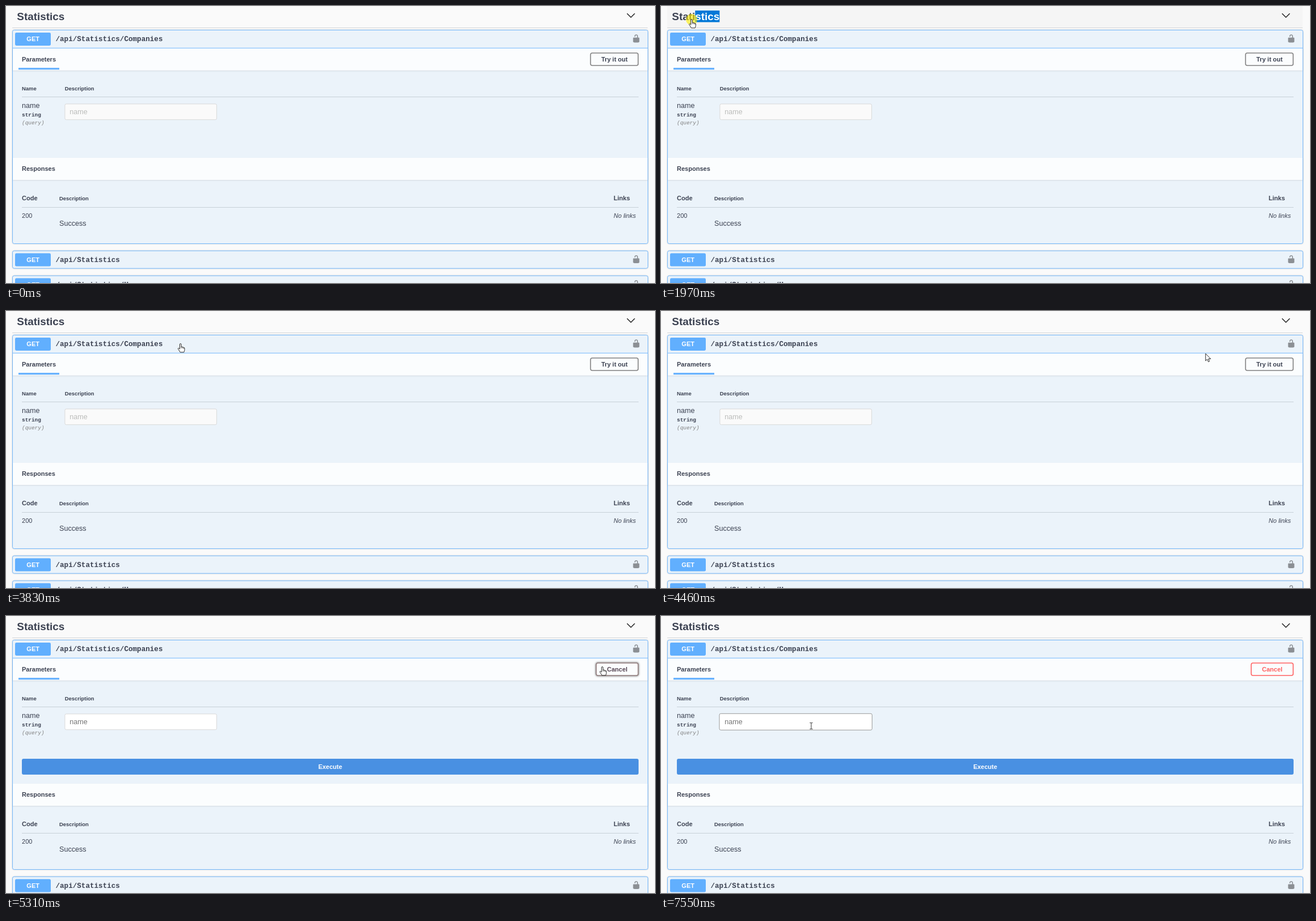
Recreate the animation shown at these times as an HTML page. Size 1145 by 489 pixels, loop 8 s.

```html
<!DOCTYPE html>
<html lang="en">
<head>
<meta charset="utf-8">
<title>API explorer</title>
<style>
html, body { margin: 0; width: 100%; height: 100%; overflow: hidden; background: #fafafa; }
svg { display: block; width: 100vw; height: 100vh; font: 11.02px "Liberation Sans", Arial, sans-serif; fill: #3b4151; }
.b { font-weight: 700; }
.sm { font-weight: 700; font-size: 9.44px; }
.lg { font-size: 12.6px; }
.title { font-weight: 700; font-size: 18.9px; }
.mono { font: 700 12.6px "Liberation Mono", "Courier New", monospace; }
.tiny { font-size: 9.44px; }
.query { font-weight: 400; font-style: italic; fill: #808080; }
.mid { text-anchor: middle; }
.white { fill: #fff; }
.block { fill: #ebf3fa; stroke: #61affe; stroke-width: .85; filter: drop-shadow(0 0 1.2px rgba(0,0,0,.19)); }
.bar { fill: #fbfdfe; filter: drop-shadow(0 1px 1px rgba(0,0,0,.1)); }
.line { fill: none; stroke: #3b4151; stroke-opacity: .2; }
.btn { fill: #fbfdfe; stroke: #808080; stroke-width: 1.6; }
.glow { fill: none; stroke: #000; stroke-opacity: .45; stroke-width: 3; filter: blur(1.6px); }
.cur { stroke: #111; stroke-width: .9; fill: #fff; stroke-linejoin: round; }
</style>
</head>
<body>
<svg viewBox="0 0 1145 489">
  <defs>
    <g id="row">
      <rect x="16" y="47" width="63" height="23" rx="2.4" fill="#61affe"/>
      <text class="b mid white" x="47.7" y="62">GET</text>
      <path transform="translate(1104 49.5) scale(.787)" fill="#8b8f94" d="M15.8 8H14V5.6C14 2.7 12.7 1 10 1S6 2.7 6 5.6V6h2v-.8C8 3.8 8.8 3 10 3s2 .8 2 2.2V8H4c-.6 0-1 .6-1 1.2V17c0 .5.4 1.1 1 1.3l1.2.4c.5.2 1.4.3 1.9.3h5.8c.5 0 1.4-.1 1.9-.3l1.2-.4c.6-.2 1-.8 1-1.3V9.2C17 8.6 16.4 8 15.8 8z"/>
    </g>
    <clipPath id="selClip"><rect id="selArea" y="7" height="24"/></clipPath>
  </defs>

  <rect id="head" x="11" y="0" width="1121" height="38" fill="#f5f5f5"/>
  <path class="line" stroke-opacity=".3" d="M11 38.5H1132"/>
  <text class="title" x="19.3" y="24.5">Statistics</text>
  <rect id="selBox" y="8" height="20.5" fill="#0078d7"/>
  <text class="title white" x="19.3" y="24.5" clip-path="url(#selClip)">Statistics</text>
  <path d="M1095.7 13.2L1102.5 20L1109.3 13.2" fill="none" stroke="#222" stroke-width="1.5"/>

  <rect id="panel" class="block" x="11.5" y="42.5" width="1121" height="377" rx="3"/>
  <use href="#row"/>
  <text class="mono" x="87.5" y="62">/api/Statistics/Companies</text>
  <rect class="bar" x="12" y="75" width="1120" height="38.7"/>
  <path d="M12 74.3H1132" stroke="#61affe" stroke-width=".85"/>
  <text class="b" x="28" y="98">Parameters</text>
  <rect x="22" y="109.2" width="72" height="3.1" fill="#61affe"/>

  <rect id="btnGlow" class="glow" y="83" height="22" rx="3"/>
  <rect id="btn" class="btn" y="83" height="22" rx="3"/>
  <text id="btnText" class="b mid" y="98"></text>

  <text class="sm" x="28" y="148.5">Name</text>
  <text class="sm" x="103.7" y="148.5">Description</text>
  <path class="line" d="M28 160.5H1116"/>
  <text class="lg" x="28" y="180">name</text>
  <text class="mono tiny" x="28" y="195">string</text>
  <text class="mono tiny query" x="28" y="209.3">(query)</text>
  <rect id="field" rx="2.5"/>
  <text id="hint" class="lg" x="112.3" y="191">name</text>
  <path id="caret" d="M112.5 179V194" stroke="#222"/>

  <g id="exec">
    <rect id="execGlow" class="glow" x="28" y="252" width="1088" height="28" rx="3"/>
    <rect x="28" y="252" width="1088" height="28" rx="3" fill="#4990e2"/>
    <text class="b mid white" x="572" y="270">Execute</text>
  </g>

  <g id="low">
    <rect class="bar" x="12" y="268" width="1120" height="39"/>
    <text class="b" x="28" y="291">Responses</text>
    <text class="b" x="28" y="343">Code</text>
    <text class="sm" x="94" y="342.5">Description</text>
    <text class="b" x="1072" y="343">Links</text>
    <path class="line" d="M28 355.5H1116"/>
    <text x="28" y="374">200</text>
    <text class="lg" x="94" y="388">Success</text>
    <text x="1072" y="374" font-style="italic">No links</text>
    <rect class="block" x="11.5" y="432.2" width="1121" height="31" rx="3"/>
    <use href="#row" y="389.6"/>
    <text class="mono" x="87.5" y="451.6">/api/Statistics</text>
    <rect class="block" x="11.5" y="476.2" width="1121" height="31" rx="3"/>
    <use href="#row" y="433.6"/>
    <text class="mono" x="87.5" y="495.6">/api/Statistics/Users</text>
  </g>

  <g id="pointer">
    <circle id="press" r="10" fill="#ffee00" fill-opacity=".6"/>
    <path id="arrow" class="cur" d="M0 0V12.6L2.9 9.9L4.8 14.4L6.9 13.5L5 9.2H9Z"/>
    <g id="hand" class="cur">
      <path d="M-1.3 9.2V.9Q-1.3 -.4 0 -.4T1.3 .9V5.2Q3.3 4.6 3.6 5.8Q5.4 5.4 5.7 6.6Q7.2 6.3 7.2 8V10.5Q7.2 12 6 14.8H-.6Q-1.8 12.2 -4 9.4Q-4.8 8.2 -3.8 7.5Q-2.8 7.2 -1.3 9.2Z"/>
      <path fill="none" stroke-width=".7" d="M1.3 5V8M3.6 5.8V8.2M5.7 6.6V8.6"/>
    </g>
    <path id="beam" fill="none" stroke="#333" d="M-2.5 -5.5H-.7L0 -5L.7 -5.5H2.5M0 -5V5M-2.5 5.5H-.7L0 5L.7 5.5H2.5"/>
  </g>
</svg>
<script>
const LOOP = 8000, STEP = 77.4, START = 270;
const OPEN = 5305, FOCUS = 7005;
const $ = id => document.getElementById(id);
const show = (id, on) => $(id).style.display = on ? '' : 'none';
const set = (id, attrs) => { for (const k in attrs) $(id).setAttribute(k, attrs[k]); };
const within = (t, a, b) => t >= a && t < b;

// pointer path: time, x, y
const path = [
  [270, 762, 466], [500, 600, 360], [750, 425, 185], [960, 185, 68], [1044, 157, 48],
  [1121, 125, 31], [1199, 112, 22], [1276, 108, 20], [1660, 108, 20],
  [1973, 54, 24], [2340, 2, 31], [2840, 2, 31],
  [3150, 130, 72], [3443, 306, 58], [3755, 306, 58], [3830, 307.5, 58],
  [4200, 680, 42], [4610, 1050, 90], [4780, 1050, 90], [4930, 1052, 90], [5600, 1052, 90],
  [5900, 1044, 100], [6070, 520, 235], [6152, 335, 274], [6230, 297, 260],
  [6400, 295, 260], [6600, 283, 235], [6780, 266, 198], [7005, 265, 194], [8000, 265, 194]
];

// Hermite slope, flat beside a rest
function slope(i, c) {
  const p = path[i - 1], q = path[i], n = path[i + 1];
  if (!p || !n || p[1] === q[1] || n[1] === q[1]) return 0;
  return (n[c] - p[c]) / (n[0] - p[0]);
}

function pointerAt(t) {
  t = Math.max(t, START);
  let i = 0;
  while (i < path.length - 2 && path[i + 1][0] <= t) i++;
  const a = path[i], b = path[i + 1], d = b[0] - a[0], u = (t - a[0]) / d;
  const v = u * u, w = v * u;
  return [1, 2].map(c =>
    a[c] * (2 * w - 3 * v + 1) + b[c] * (3 * v - 2 * w) +
    slope(i, c) * d * (w - 2 * v + u) + slope(i + 1, c) * d * (w - v));
}

// letter edges of the heading, in em
const edges = [0, .667, 1, 1.556, 1.889, 2.167, 2.723, 3.056, 3.334, 3.89, 4.446].map(e => 19.3 + e * 18.9);
const END = edges[10];

function select(t) {
  let x = END;
  if (within(t, 1665, FOCUS)) {
    const px = pointerAt(t - 40)[0];
    x = edges.reduce((m, e) => Math.abs(e - px) < Math.abs(m - px) ? e : m);
  }
  set('selBox', { x, width: END - x });
  set('selArea', { x, width: END - x });
}

const mix = (a, b, p) => `rgb(${a.map((v, i) => Math.round(v + (b[i] - v) * p))})`;

function render(t) {
  const tick = t < START - 5 ? t : START + Math.floor((t - START + 5) / STEP) * STEP;
  const [x, y] = pointerAt(tick);
  const seen = t >= START - 5, open = t >= OPEN, focus = t >= FOCUS;
  const over = (l, top, r, bottom) => seen && x >= l && x < r && y >= top && y < bottom;

  const left = open ? 1041.3 : 1031.3;
  const onHead = over(11, 0, 1132, 38), onBtn = over(left, 83, 1116, 106);
  const onExec = open && over(28, 252, 1116, 280), onField = over(104, 173, 372, 201);
  const link = onHead || onBtn || onExec || over(11, 42, 1132, 74);

  show('head', onHead);
  select(tick);

  const box = { x: left, width: 1115.3 - left };
  set('btn', box);
  set('btnGlow', box);
  show('btnGlow', onBtn);
  const p = Math.min(1, Math.max(0, (tick - 5260) / 300));
  const red = [255, 96, 96];
  $('btn').style.stroke = mix([128, 128, 128], red, open ? p : 0);
  $('btnText').style.fill = mix([59, 65, 81], red, open ? p : 0);
  $('btnText').textContent = open ? 'Cancel' : 'Try it out';
  set('btnText', { x: open ? 1078.3 : 1073.5 });

  set('field', focus
    ? { x: 103, y: 172.3, width: 269.4, height: 29, fill: '#fff', stroke: '#999' }
    : { x: 103.9, y: 172.9, width: 267.8, height: 27.8, fill: open ? '#fff' : '#fafafa', stroke: '#d9d9d9' });
  set('hint', { fill: open ? '#757575' : '#bbbcba' });
  show('caret', within(t, FOCUS, 7545));

  show('exec', open);
  show('execGlow', onExec);
  set('panel', { height: open ? 405 : 377 });
  set('low', { transform: `translate(0 ${open ? 28 : 0})` });

  show('pointer', seen);
  set('pointer', { transform: `translate(${x.toFixed(2)} ${y.toFixed(2)})` });
  show('press', within(t, 1665, 2735) || within(t, 5155, 5235) || within(t, FOCUS, 7085));
  show('hand', link);
  show('beam', onField);
  show('arrow', !link && !onField);
}

let begin;
function frame(now) {
  begin ??= now;
  render((now - begin) % LOOP);
  requestAnimationFrame(frame);
}
render(0);
requestAnimationFrame(frame);
</script>
</body>
</html>
```
